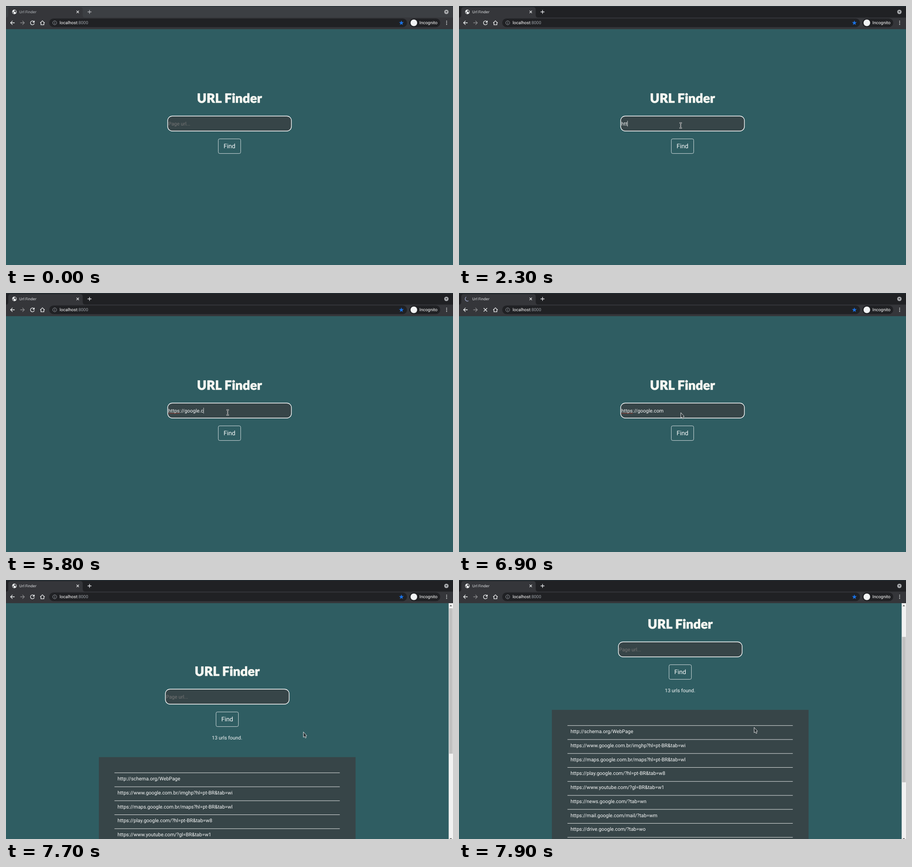
Animation, 982 px wide and 570 px high, one loop 8 s. Source, as an HTML page:

```html
<!DOCTYPE html>
<html lang="en">
<head>
<meta charset="utf-8">
<title>Url Finder</title>
<style>
  html, body { margin: 0; width: 100%; height: 100%; overflow: hidden; background: #2f5d62; }
  svg { display: block; width: 982px; height: 570px; }
  text { font: 10.91px Roboto, sans-serif; fill: #f8f9f9; text-rendering: geometricPrecision; white-space: pre; }
  #title { font: 900 28px Lato, sans-serif; fill: #f8f8f2; stroke: #f8f8f2; stroke-width: .7; stroke-linejoin: round; letter-spacing: .2px; }
  .mid { text-anchor: middle; }
  .ui { font-size: 9.55px; fill: #fff; }
  .icon { fill: none; stroke: #f1f3f4; stroke-width: 1.3; }
</style>
</head>
<body>
<svg viewBox="0 0 982 570">
  <rect width="982" height="570" fill="#2f5d62"/>

  <g id="page">
    <g id="form">
      <text id="title" class="mid" x="491" y="213.3">URL Finder</text>
      <rect x="355.2" y="242.2" width="271.8" height="33" rx="10" fill="#374548" stroke="#fafafa" stroke-width="1.4"/>
      <text id="hint" x="356.6" y="262.8" style="fill:#757575">Page url...</text>
      <text id="typed" x="356.6" y="262.8"></text>
      <path id="spell" d="M357 264.8h25" stroke="#d0402c" stroke-width="1" stroke-dasharray="1.4 .7"/>
      <path id="caret" stroke="#fff" stroke-width=".8"/>
      <rect x="466.4" y="292.4" width="49.2" height="32.2" rx="3.2" fill="none" stroke="#f8f9fa" stroke-width=".8"/>
      <text class="mid" x="491" y="313.4" style="font-size:13.64px">Find</text>
    </g>
    <g id="results">
      <text class="mid" x="485.7" y="353">13 urls found.</text>
      <rect x="204" y="391.8" width="564" height="500" fill="#374548"/>
    </g>
  </g>

  <g id="scrollbar">
    <rect x="972.5" y="51" width="9.5" height="519" fill="#f1f1f1"/>
    <rect id="thumb" x="973.5" width="8" height="320" fill="#c1c1c1"/>
    <path id="up" d="M974.7 57.8h5l-2.5-3z"/>
    <path d="M974.7 568.5h5l-2.5 3z" fill="#505050"/>
  </g>

  <g id="chrome">
    <rect id="strip" width="982" height="26"/>
    <rect width="982" height="1.3" fill="#263238"/>
    <path d="M0 25.5Q5 25.5 5 20V8q0-5.5 5.5-5.5H163q5.5 0 5.5 5.5v12q0 5.5 5.5 5.5H982V51H0z" fill="#35363a"/>
    <g id="globe">
      <circle cx="18.4" cy="13" r="4.9" fill="#f1f3f4"/>
      <path d="M14.5 12.3l2.6 2.4v2.1l-1.2-.5q-1.8-1.6-1.4-4zM19.6 9.1l2 1.2q1.2 2 .2 4.6l-1.3-1v-1.3h-3.6v-1h1.3l.6-1.5z" fill="#35363a"/>
    </g>
    <path id="spinner" d="M16 8.8A4.8 4.8 0 1 0 20.8 17.2" fill="none" stroke="#aab2d8" stroke-width="1.2"/>
    <text id="tab" x="29" y="16" style="font:8.2px 'Noto Sans',sans-serif">Url Finder</text>
    <path class="icon" d="M155 10.4l5.2 5.2m0-5.2l-5.2 5.2"/>
    <path id="plus" class="icon" d="M179.3 13h8.4M183.5 8.8v8.4"/>
    <circle cx="967.5" cy="13" r="4.8" fill="#a9abae"/>
    <path d="M965.2 11.8h4.6l-2.3 2.7z" fill="#292a2d"/>

    <path class="icon" d="M19 37H10.2M14.4 32.6L10 37l4.4 4.4"/>
    <path class="icon" d="M31.4 37h8.8M36 32.6l4.4 4.4-4.4 4.4" style="stroke:#88898c"/>
    <g id="reload">
      <path class="icon" d="M61 34A4.3 4.3 0 1 0 62.2 38.2"/>
      <path d="M62.8 31.8v4.6h-4.6z" fill="#f1f3f4"/>
    </g>
    <path id="stop" class="icon" d="M54.2 33.2l7.6 7.6m0-7.6l-7.6 7.6"/>
    <path class="icon" d="M74.9 37.4L80 32.6l5.1 4.8M76.7 36v5.4h6.6V36"/>
    <rect x="95" y="27.6" width="786" height="18.8" rx="9.4" fill="#202124"/>
    <circle class="icon" cx="107" cy="37" r="4.3" style="stroke:#9aa0a6;stroke-width:.9"/>
    <path d="M107 34.3v1.1m0 .9v3.2" stroke="#9aa0a6"/>
    <text class="ui" x="117.8" y="40.3">localhost<tspan fill="#9aa0a6">:8000</tspan></text>
    <path id="star" fill="#1a73e8"/>
    <rect x="886" y="27.6" width="68" height="18.8" rx="9.4" fill="#202124"/>
    <circle cx="896" cy="37" r="7.3" fill="#f1f3f4"/>
    <text class="ui" x="908.3" y="40.3">Incognito</text>
    <path d="M968 33.5v.01M968 37v.01M968 40.5v.01" stroke="#f1f3f4" stroke-width="2" stroke-linecap="round"/>
  </g>

  <g id="arrow">
    <path d="M.3.3v11.9l2.6-2 1.7 3.6 2-.9-1.4-3.5 2.7-.6z" fill="#2a3336" stroke="#f4f4f4" stroke-width=".9"/>
  </g>
  <g id="beam" fill="none">
    <path d="M-2.6-5.6H2.6M0-5.6V5.6M-2.6 5.6H2.6" stroke="#f4f4f4" stroke-width="2.2"/>
    <path d="M-2.2-5.6H2.2M0-5.6V5.6M-2.2 5.6H2.2" stroke="#22292b" stroke-width=".9"/>
  </g>
</svg>
<script>
const $ = id => document.getElementById(id);
const set = (id, name, value) => $(id).setAttribute(name, value);
const show = (id, on) => set(id, "visibility", on ? "visible" : "hidden");
const move = (id, x, y) => set(id, "transform", `translate(${x} ${y})`);

const address = "https://google.com";
const keyTimes = [2000, 2200, 2300, 2500, 2800, 3200, 3500, 3700, 4100,
  4300, 4400, 5200, 5300, 5400, 5600, 5800, 5900, 6000];
const clickTime = 1700, loadStart = 6200, loadEnd = 7000;

// time, x, y
const pointer = [[400, 470, 4], [600, 455, 110], [800, 436, 215], [1000, 429, 261],
  [1100, 429.5, 261], [1300, 429.5, 261], [1700, 487, 263], [7200, 487, 263], [7400, 677, 376],
  [7500, 677, 376], [7700, 653, 334], [7800, 649, 326], [7900, 648, 324]];
const scrolling = [[7600, 0], [7700, 2], [7900, 106]];

const links = ["http://schema.org/WebPage",
  "https://www.google.com.br/imghp?hl=pt-BR&tab=wi",
  "https://maps.google.com.br/maps?hl=pt-BR&tab=wl",
  "https://play.google.com/?hl=pt-BR&tab=w8",
  "https://www.youtube.com/?gl=BR&tab=w1",
  "https://news.google.com/?tab=wn",
  "https://mail.google.com/mail/?tab=wm",
  "https://drive.google.com/?tab=wo", ""];

function add(parent, tag, attrs, text = "") {
  const el = document.createElementNS("http://www.w3.org/2000/svg", tag);
  for (const name in attrs) el.setAttribute(name, attrs[name]);
  el.textContent = text;
  $(parent).append(el);
}

links.forEach((link, i) => {
  const y = 426.3 + i * 30.75;
  add("results", "path", { d: `M238.3 ${y}H733.3`, stroke: "#f4f5f5", "stroke-width": .9 });
  add("results", "text", { x: 245, y: y + 16.8 }, link);
});

const starPoints = Array.from({ length: 10 }, (_, i) => {
  const r = i % 2 ? 2.3 : 5.6, a = i * Math.PI / 5;
  return [868.6 + r * Math.sin(a), 37.3 - r * Math.cos(a)];
});
set("star", "d", `M${starPoints.join("L")}z`);

// Linear interpolation between [time, ...values] keys.
function at(keys, t) {
  const next = keys.findIndex(key => key[0] > t);
  if (next < 1) return keys.at(next).slice(1);
  const a = keys[next - 1], b = keys[next], f = (t - a[0]) / (b[0] - a[0]);
  return a.slice(1).map((v, i) => v + (b[i + 1] - v) * f);
}

function draw(t) {
  const focused = t >= 400, loading = t >= loadStart && t < loadEnd, loaded = t >= loadEnd;
  set("strip", "fill", focused ? "#202124" : "#3c3f43");
  $("tab").style.fill = focused ? "#e8eaed" : "#bdc1c6";
  $("plus").style.stroke = focused ? "#e8eaed" : "#b4b7bb";

  show("globe", !loading);
  show("reload", !loading);
  show("stop", loading);
  show("spinner", loading);
  set("spinner", "transform", `rotate(${(6900 - t) * .27} 18.4 13)`);

  const count = loaded ? 0 : keyTimes.filter(k => k <= t).length;
  $("typed").textContent = address.slice(0, count);
  show("hint", !count);
  show("spell", count > 6);
  const lastKey = count ? keyTimes[count - 1] : clickTime;
  show("caret", t >= clickTime && !loaded && Math.floor((t - lastKey) / 550) % 2 === 0);
  const caretX = 357 + (count ? $("typed").getComputedTextLength() : 0);
  set("caret", "d", `M${caretX} 252.5V265.3`);

  const scroll = loaded ? at(scrolling, Math.max(t, 7600))[0] : 0;
  move("page", 0, -scroll);
  move("form", loaded ? -5 : 0, 0);
  show("results", loaded);
  show("scrollbar", loaded);
  set("thumb", "y", 61 + scroll * .606);
  set("up", "fill", scroll ? "#505050" : "#a3a3a3");

  const [x, y] = at(pointer, t);
  const inField = y > 242 && t < 6300;
  move("arrow", x, y);
  move("beam", x, y);
  show("arrow", focused && !inField);
  show("beam", focused && inField);
}

function tick() {
  draw(Math.floor(performance.now() % 8000 / 100) * 100);
  requestAnimationFrame(tick);
}
tick();
</script>
</body>
</html>
```
